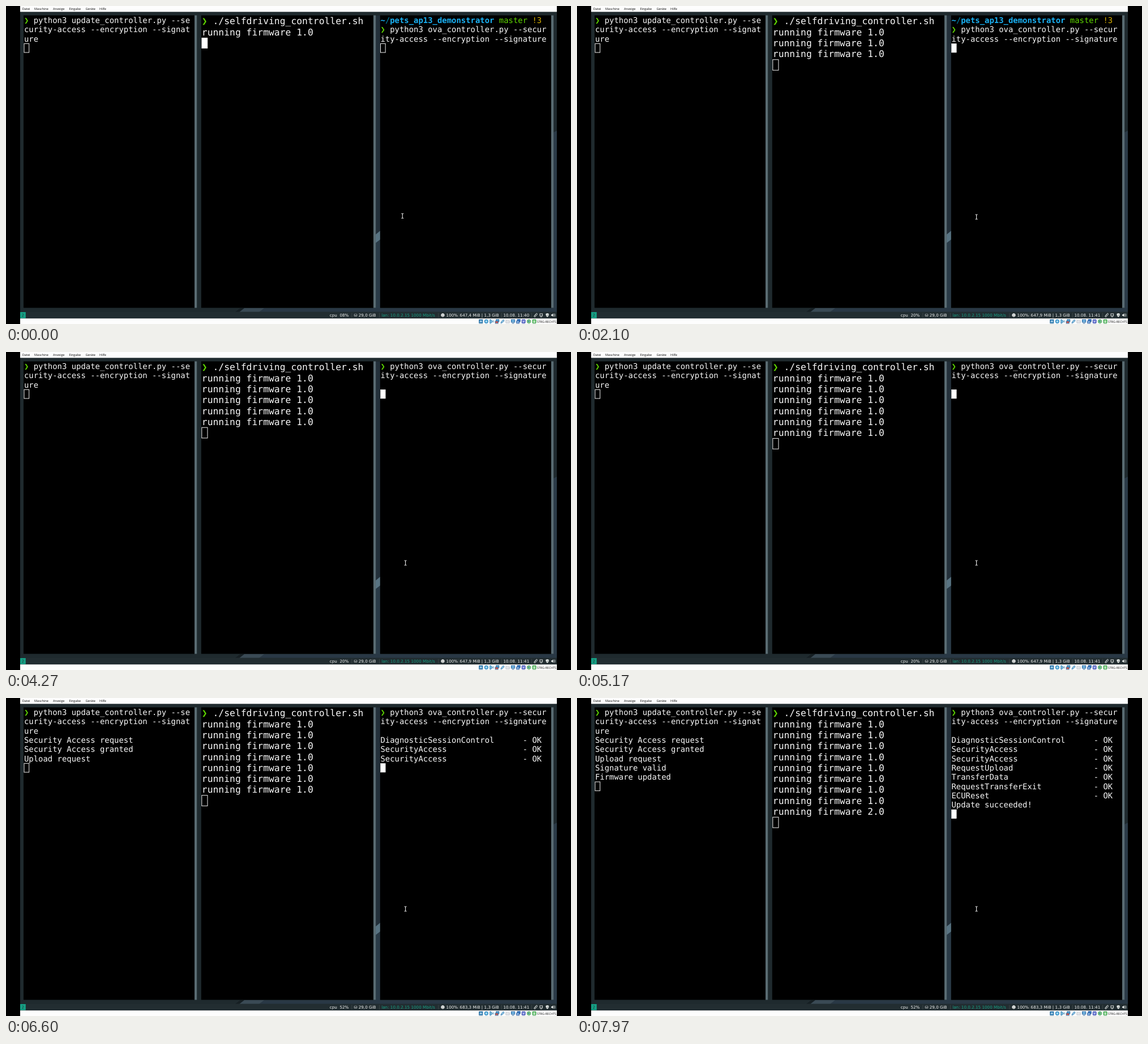
An HTML page for the animation above (8000 ms loop, 998x561 px).

```html
<!DOCTYPE html>
<html lang="de">
<head>
<meta charset="utf-8">
<title>Firmware update</title>
<style>
  html, body { margin: 0; width: 100%; height: 100%; overflow: hidden; background: #000; }
  svg { display: block; width: 998px; height: 561px; }
  text { white-space: pre; text-rendering: geometricPrecision; }
  .term { font-family: "DejaVu Sans Mono", monospace; fill: #f8f8f8; }
  .bar { font: 7.2px "DejaVu Sans", sans-serif; fill: #f0f2f1; }
  .menu { font: 5.6px "Open Sans", sans-serif; fill: #111; }
  .b { font-weight: bold; }
</style>
</head>
<body>
<svg id="stage" viewBox="0 0 998 561">
  <rect width="998" height="561"/>
  <!-- wallpaper -->
  <rect x="25" y="10" width="948" height="530" fill="#1f2a2e"/>
  <path d="M653 17h8v380l-8 6z" fill="#23303a"/>
  <path d="M653 403l8-6.5v16l-8 6z" fill="#587382"/>
  <path d="M653 418l8-6v121h-8z" fill="#2a3b47"/>
  <path d="M967 223l6-3v320h-6z" fill="#2b3a47"/>
  <path d="M455 533h518v7H447z" fill="#293845"/>
  <path d="M404 540l9-7h43l-9 7z" fill="#3a4a55"/>
  <path d="M404 540l9-7h8l-9 7z" fill="#161f23"/>
  <!-- menu and status strips -->
  <rect x="25" width="948" height="10.3" fill="#fdfdfd"/>
  <rect x="25" y="539.5" width="948" height="11.8" fill="#222d31"/>
  <rect x="25" y="551.2" width="948" height="9.8" fill="#fdfdfd"/>
  <rect x="25" y="540" width="9.8" height="10.8" fill="#16a085"/>
  <text class="bar" x="27.6" y="548" style="fill:#22423f">2</text>
  <g id="panes"></g>
  <g id="bars"></g>
  <!-- tray -->
  <g fill="none" stroke="#e8ecea" stroke-width=".9">
    <path d="M932.5 547.5l4-5a1.2 1.2 0 0 1 1.8 1.5l-3.6 4.4a.9.9 0 0 1-1.4-1.1l2.8-3.4"/>
    <rect x="943" y="543" width="4.6" height="3.8"/>
    <path d="M943.8 548.3h3"/>
    <path d="M967.6 543.3q1.6 2 0 4M969 542.4q2.4 3 0 5.8" stroke-width=".7"/>
    <path d="M953.4 543l2.8-1 2.8 1q0 4-2.8 5.8q-2.8-1.8-2.8-5.8z" fill="#e8ecea" stroke="none"/>
    <path d="M955 545.2l1 1.1 1.7-2" stroke="#222d31" stroke-width=".7"/>
    <path d="M963 544.2h1.4l2.2-1.9v6l-2.2-1.9H963z" fill="#e8ecea" stroke="none"/>
  </g>
  <!-- machine icons -->
  <g stroke-width=".9" fill="none">
    <rect x="835.8" y="553.3" width="6" height="6.2" fill="#3d8fc4" stroke="#1f5f91"/>
    <path d="M837.3 558l1.5-3 1.5 3" stroke="#fff"/>
    <circle cx="848.4" cy="556.4" r="3.2" fill="#63b7e3" stroke="#2479b0"/>
    <circle cx="848.4" cy="556.4" r=".9" fill="#fff"/>
    <path d="M854.8 553.3v6.4h1.6l3.4-3.2-3.4-3.2z" fill="#79b9dd" stroke="#2b78aa"/>
    <path d="M860.6 554.4q1.4 2 0 4" stroke="#2b78aa"/>
    <rect x="865.8" y="553" width="5" height="4" fill="#5aa5d6" stroke="#26689c"/>
    <rect x="864.2" y="556" width="5" height="3.8" fill="#d9574b" stroke="#26689c"/>
    <path d="M874 559.6l1-2.8 3.2-3.6 2 1.8-3.2 3.6z" fill="#8fc3e2" stroke="#3681b5"/>
    <path d="M882.9 554.2h2.5l.8.8h3.2v4.2h-6.5z" fill="#e4e6ea" stroke="#bfc5cc"/>
    <rect x="892.5" y="553.3" width="6.2" height="4.6" fill="#72b4e0" stroke="#1f5f9c"/>
    <path d="M893.6 559.7h4" stroke="#1f5f9c"/>
    <rect x="903.4" y="552.9" width="4.8" height="4" fill="#3f8bd0" stroke="#174a94"/>
    <rect x="901.8" y="555.6" width="4.8" height="4" fill="#8dbbe8" stroke="#174a94"/>
    <rect x="911.2" y="553.2" width="6" height="6.4" rx="1" fill="#6575cf" stroke="#4a55b2"/>
    <path d="M912.7 555l1.5 3 1.5-3" stroke="#e5e8ff"/>
    <circle cx="923.6" cy="556.4" r="3.2" fill="#8fd08f" stroke="#3a9a55"/>
    <path d="M922.4 554.6v3.4l2.7-1.5z" fill="#2574a5"/>
    <rect x="930" y="553.2" width="6.2" height="6.4" rx=".8" fill="#76ca7b" stroke="#37974a"/>
    <path d="M933.1 554.5v3.8M931.6 556.9l1.5 1.5 1.5-1.5" stroke="#fff"/>
  </g>
  <!-- pointer -->
  <g id="mouse" fill="none">
    <path d="M-2-4q2 0 2 1q0-1 2-1M0-3v7M-2 4.5q2 0 2-1q0 1 2 1" stroke="#e8e8e8" stroke-width="1.1"/>
  </g>
</svg>
<script>
const LOOP = 8000, FOCUS = 1030, ENTER = 4130;
const $ = id => document.getElementById(id);

function add(parent, tag, attrs, body) {
  const el = document.createElementNS('http://www.w3.org/2000/svg', tag);
  for (const k in attrs) el.setAttribute(k, attrs[k]);
  if (body) el.textContent = body;
  return parent.appendChild(el);
}

const ok = name => name.padEnd(30) + '- OK';
const beat = [570, 1600, 2600, 3600, 4630, 5670, 6700].map(at => [at, 'running firmware 1.0']);

// head: lines always present; log: [time, line]
const panes = [
  { x: 31, w: 302, tx: 32, size: 13.92, row: 16.33, top: 17,
    head: ['  python3 update_controller.py --se', 'curity-access --encryption --signat', 'ure'],
    log: [[5900, 'Security Access request'], [6300, 'Security Access granted'],
      [6330, 'Upload request'], [7100, 'Signature valid'], [7200, 'Firmware updated']] },
  { x: 344.8, w: 304.2, tx: 345.8, size: 16.37, row: 19.26, top: 17.3,
    head: ['  ./selfdriving_controller.sh', 'running firmware 1.0'],
    log: [...beat, [7700, 'running firmware 2.0']] },
  { x: 660.8, w: 302.2, tx: 661.5, size: 13.92, row: 16.33, top: 17,
    head: ['  python3 ova_controller.py --secur', 'ity-access --encryption --signature', ''],
    log: [[5730, ok('DiagnosticSessionControl')], [6070, ok('SecurityAccess')],
      [6300, ok('SecurityAccess')], [6630, ok('RequestUpload')], [6900, ok('TransferData')],
      [7500, ok('RequestTransferExit')], [7700, ok('ECUReset')], [7900, 'Update succeeded!']] }
];

function line(p, parent, row, str, fill) {
  const attrs = { class: 'term', x: p.tx, y: p.top + row * p.row + p.size * 0.928, 'font-size': p.size };
  if (fill) attrs.style = 'fill:' + fill;
  return add(parent, 'text', attrs, str);
}

for (const p of panes) {
  const g = add($('panes'), 'g', {});
  add(g, 'rect', { x: p.x, y: 16.5, width: p.w, height: 516 });
  add(g, 'rect', { x: p.x + p.w, y: 16.5, width: 4.2, height: 516, fill: '#596b72' });
  p.cmd = add(g, 'g', {});
  line(p, p.cmd, 0, '❯', '#5fd700');
  p.head.forEach((s, i) => line(p, p.cmd, i, s));
  p.lines = p.log.map(([at, s], i) => ({ at, el: line(p, g, p.head.length + i, s) }));
  p.cursor = add(g, 'rect', { x: p.tx, width: p.size * 0.602 + 0.3, height: p.row - 0.6, stroke: '#f0f0f0' });
}

const right = panes[2];
const path = line(right, $('panes'), 0, '');
for (const [s, fill, cls] of [['~', '#1ab2f5', 'b'], ['/', '#0087af', ''],
  ['pets_ap13_demonstrator', '#1ab2f5', 'b'], [' master', '#5fd700', ''], [' !3', '#d7af00', '']])
  add(path, 'tspan', { class: cls, style: 'fill:' + fill }, s);

const menu = (x, y, s) => add($('bars'), 'text', { class: 'menu', x, y }, s);
[[28.8, 'Datei'], [50, 'Maschine'], [83, 'Anzeige'], [111.4, 'Eingabe'], [140.4, 'Geräte'], [165, 'Hilfe']]
  .forEach(([x, s]) => menu(x, 7.3, s));
menu(938, 558.5, 'STRG-RECHTS').style.fontSize = '5.3px';

const status = (x, s) => add($('bars'), 'text', { class: 'bar', x, y: 547.8 }, s);
const cpu = status(571.8, ''), mem = status(801.6, ''), clock = status(878.4, '');
status(614.4, '⛁ 29,0 GiB');
status(663.2, 'lan: 10.0.2.15 1000 Mbit/s').style.fill = '#16a085';
status(767.8, '☻ 100%');
for (const x of [610.5, 659, 763.5, 799.6, 875.3, 928])
  add($('bars'), 'rect', { x, y: 541.5, width: 0.7, height: 8, fill: '#454f50' });

const stats = [[0, '08', '647,4', '11:40'], [1100, '20', '647,9', '11:41'], [6130, '52', '683,3', '11:41']];

function draw(t) {
  panes.forEach((p, i) => {
    let n = p.head.length;
    for (const l of p.lines) {
      const on = t >= l.at;
      l.el.style.display = on ? '' : 'none';
      n += on;
    }
    const focused = i === (t < FOCUS ? 1 : 2);
    p.cursor.setAttribute('y', p.top + n * p.row + 0.3);
    p.cursor.setAttribute('fill', focused ? '#fff' : 'none');
    p.cursor.setAttribute('stroke-width', focused ? 0.5 : 1);
  });
  const waiting = t < ENTER;
  path.style.display = waiting ? '' : 'none';
  right.cmd.setAttribute('transform', `translate(0 ${waiting ? right.row : 0})`);

  const [, load, used, time] = stats.filter(s => t >= s[0]).pop();
  cpu.textContent = `cpu  ${load}%`;
  mem.textContent = `${used} MiB | 1,3 GiB`;
  clock.textContent = `10.08. ${time}`;

  const k = Math.min(1, Math.max(0, (t - 930) / 200));
  $('mouse').setAttribute('transform', `translate(${700.3 + 5.3 * k} ${370 + 1.8 * k})`);
}

const start = performance.now();
function tick() {
  draw((performance.now() - start) % LOOP);
  requestAnimationFrame(tick);
}
tick();
</script>
</body>
</html>
```
